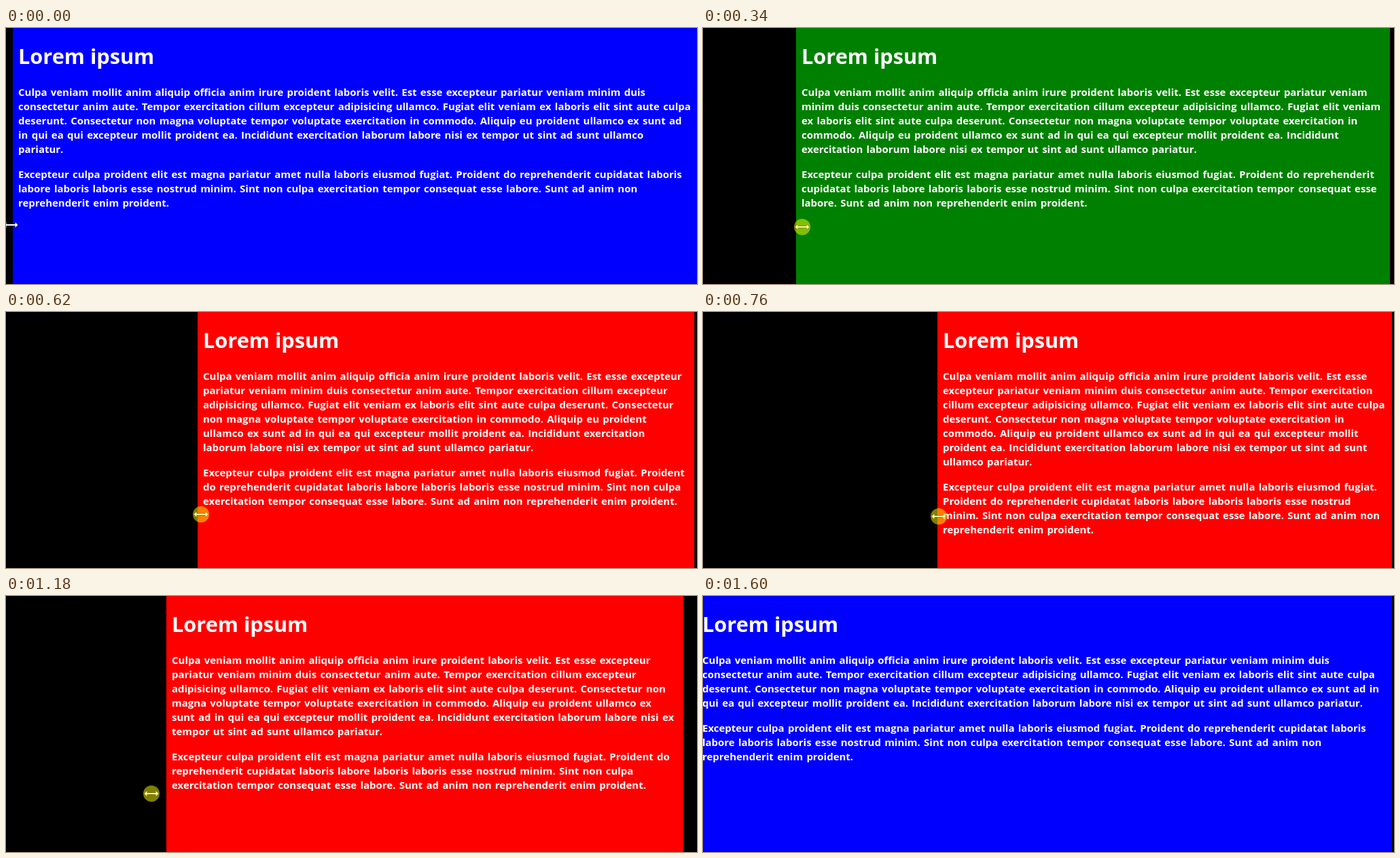
Write an HTML page that moves like this. It is 1017x377 px and loops after 1670 ms.

```html
<!DOCTYPE html>
<html lang="en">
<head>
<meta charset="utf-8">
<title>Resizing a page</title>
<style>
  html, body { margin: 0; width: 100%; height: 100%; overflow: hidden; background: #000; }
  svg { display: block; width: 100%; height: 100%; }
  text { font: bold 14.97px "Open Sans", "Noto Sans", sans-serif; word-spacing: 1.4px; fill: #fff; }
  .title { font-size: 30.7px; word-spacing: 0; }
</style>
</head>
<body>
<svg id="stage" viewBox="0 0 1017 377">
  <rect width="1017" height="377" fill="#000"/>
  <rect id="page" height="377"/>
  <g id="copy"><text class="title" y="53">Lorem ipsum</text></g>
  <g id="cursor">
    <circle id="press" r="12" fill="#ff0" fill-opacity=".5"/>
    <path id="arrow" stroke-width="1" paint-order="stroke" stroke-linejoin="round"
      d="M-10.5 0 L-6.5 -4 V-1 H6.5 V-4 L10.5 0 L6.5 4 V1 H-6.5 V4 Z"/>
  </g>
</svg>
<script>
const LOOP = 1670, HOLD = 130, STEP = 70;
const MARGIN = 8, LINE = 21, GAP = 16, TOP = 100;
const LAG = 4; // the text reflows slightly behind the frame

const paragraphs = [
  "Culpa veniam mollit anim aliquip officia anim irure proident laboris velit. Est esse excepteur pariatur veniam minim duis consectetur anim aute. Tempor exercitation cillum excepteur adipisicing ullamco. Fugiat elit veniam ex laboris elit sint aute culpa deserunt. Consectetur non magna voluptate tempor voluptate exercitation in commodo. Aliquip eu proident ullamco ex sunt ad in qui ea qui excepteur mollit proident ea. Incididunt exercitation laborum labore nisi ex tempor ut sint ad sunt ullamco pariatur.",
  "Excepteur culpa proident elit est magna pariatur amet nulla laboris eiusmod fugiat. Proident do reprehenderit cupidatat laboris labore laboris laboris esse nostrud minim. Sint non culpa exercitation tempor consequat esse labore. Sunt ad anim non reprehenderit enim proident."
];

// time, left edge, right edge, cursor x, cursor y
const keys = [
  [0, 10, 1019, 7, 290],
  [130, 27, 1011, 32, 290],
  [340, 137, 1011, 146, 293],
  [480, 204, 1012, 212, 295],
  [620, 282, 1013, 287, 298],
  [760, 345, 1014, 347, 301],
  [900, 375, 1016, 374, 302],
  [1040, 335, 992, 312, 299],
  [1180, 236, 997, 214, 291],
  [1390, 86, 1010, 77, 277],
  [1530, 17, 1013, 4, 277],
  [1600, -9, 1014, -24, 280]
];

const $ = id => document.getElementById(id);
const page = $("page"), copy = $("copy"), cursor = $("cursor"), press = $("press"), arrow = $("arrow");

const set = (el, attrs) => {
  for (const name in attrs) el.setAttribute(name, attrs[name]);
};

const rows = Array.from({ length: 14 }, () =>
  copy.appendChild(document.createElementNS("http://www.w3.org/2000/svg", "text")));

const pen = document.createElement("canvas").getContext("2d");
const style = getComputedStyle(rows[0]);
pen.font = `bold ${style.fontSize} ${style.fontFamily}`;
const extraSpace = parseFloat(style.wordSpacing);

const measure = words => pen.measureText(words.join(" ")).width + (words.length - 1) * extraSpace;

function wrap(text, width) {
  const lines = [[]];
  for (const word of text.split(" ")) {
    const line = lines[lines.length - 1];
    if (line.length && measure([...line, word]) > width) lines.push([word]);
    else line.push(word);
  }
  return lines.map(words => words.join(" "));
}

function pose(t) {
  const i = Math.max(1, keys.findIndex(k => k[0] >= t));
  const a = keys[i - 1], b = keys[i], f = (t - a[0]) / (b[0] - a[0]);
  return a.map((v, n) => v + (b[n] - v) * f);
}

const pageColor = width => width < 768 - MARGIN / 2 ? "#f00" : width < 992 ? "#008000" : "#00f";

function draw(t) {
  const [, left, right, cx, cy] = pose(t).map(Math.round);
  const [, oldLeft, oldRight] = pose(Math.max(0, t - LAG));
  const width = right - left;
  set(page, { x: left, width, fill: pageColor(width) });
  set(copy, { transform: `translate(${left + MARGIN} 0)` });

  let row = 0, y = TOP;
  for (const p of paragraphs) {
    for (const line of wrap(p, oldRight - oldLeft - 2 * MARGIN - 2)) {
      rows[row].textContent = line;
      set(rows[row++], { y });
      y += LINE;
    }
    y += GAP;
  }
  while (row < rows.length) rows[row++].textContent = "";

  const pressed = t > 0;
  set(cursor, { transform: `translate(${cx} ${cy})` });
  set(press, { visibility: pressed ? "visible" : "hidden" });
  set(arrow, pressed ? { fill: "#fff8a0", stroke: "#6a6000" } : { fill: "#fff", stroke: "#000" });
}

// The window redraws in hard steps after an opening hold.
const snap = t => t < HOLD ? 0 : HOLD + Math.floor((t - HOLD) / STEP) * STEP;

const start = performance.now();
let shown = -1;
function tick() {
  const t = snap((performance.now() - start) % LOOP);
  if (t !== shown) draw(shown = t);
  requestAnimationFrame(tick);
}
tick();
</script>
</body>
</html>
```
